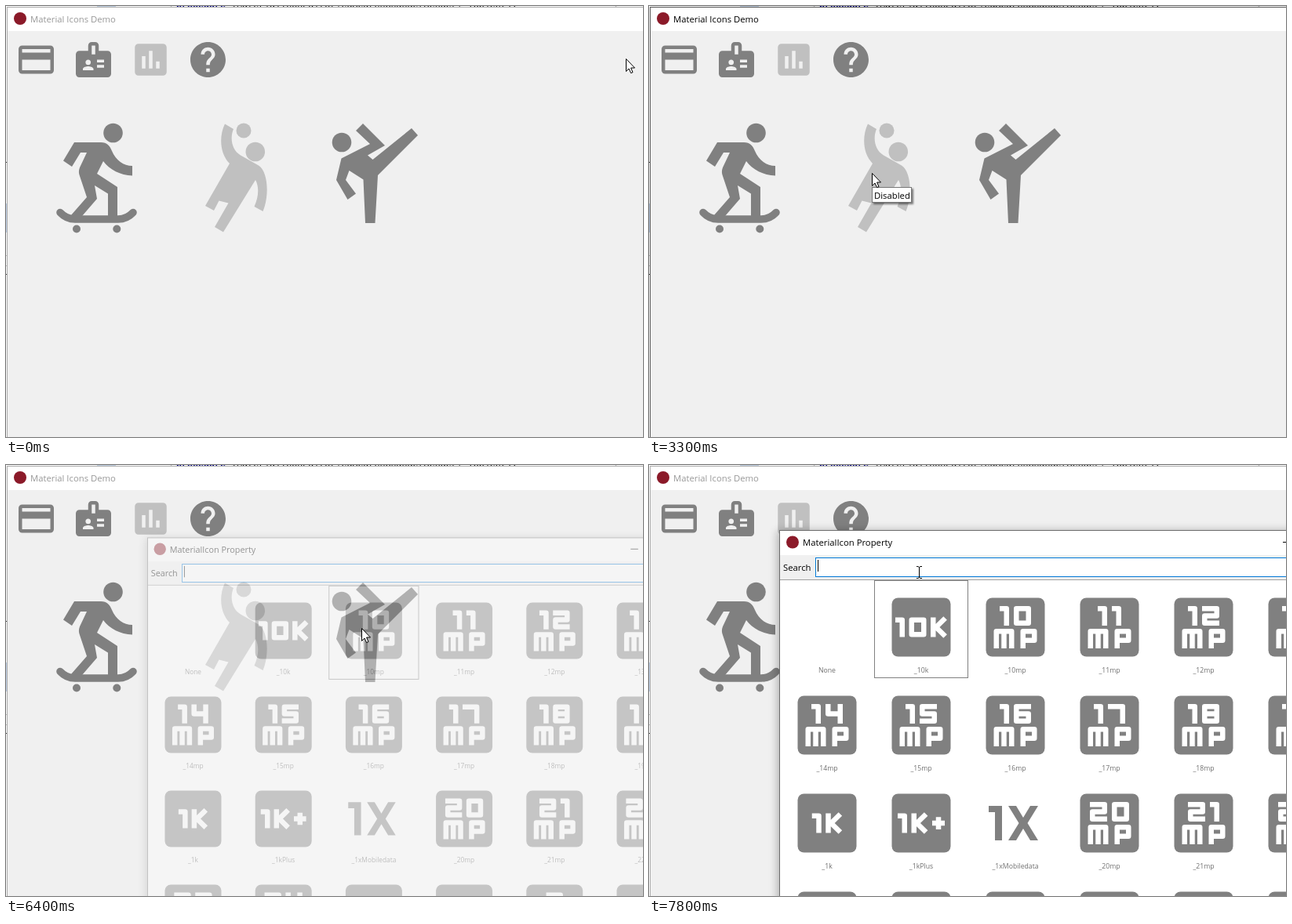
Animation, 812 px wide and 550 px high, one loop 8 s. Source, as an HTML page:

```html
<!DOCTYPE html>
<html lang="en">
<head>
<meta charset="utf-8">
<title>Material Icons Demo</title>
<style>
  html, body { margin: 0; width: 100%; height: 100%; overflow: hidden; background: #f0f0f0; }
  svg { display: block; width: 812px; height: 550px; }
  text { font: 11.3px "Open Sans", "Noto Sans", sans-serif; }
  .code { font: 11.7px "Liberation Mono", monospace; }
  .label { font-size: 8.7px; fill: #707070; text-anchor: middle; }
  .glyph { fill: none; stroke: #fff; stroke-width: 6.5; stroke-linecap: square; stroke-linejoin: round; }
  .glyph path { vector-effect: non-scaling-stroke; }
  #tip { filter: drop-shadow(2px 2px 1.2px rgba(0, 0, 0, .5)); }
</style>
</head>
<body>
<svg viewBox="0 0 812 550">
  <defs>
    <filter id="soft" x="-10%" y="-10%" width="120%" height="120%"><feGaussianBlur stdDeviation="6"/></filter>
  </defs>

  <!-- editor behind the window -->
  <rect width="812" height="550" fill="#fff"/>
  <rect x="116" width="24" height="2" fill="#c3d3e6"/>
  <path d="M210.5 0V2M777.5 0V2" stroke="#aaa"/>
  <text class="code" x="217" y="2" fill="#000"><tspan font-weight="bold" fill="#000080">procedure</tspan> TMaterialIconEditor.edSearchChange(Sender: TObject);</text>
  <path d="M0 252H2V289H0Z" fill="#bfd0e8"/>
  <path d="M0 199.5H2M0 342.5H2" stroke="#333"/>
  <path d="M0 318.5H1M0 331.5H1" stroke="#bbb"/>

  <!-- main window -->
  <rect x="1" y="1" width="820" height="560" fill="#f0f0f0"/>
  <rect x="1" y="1" width="820" height="31" fill="#fff"/>
  <rect id="edge" x="1.5" y="1.5" width="820" height="560" fill="none"/>
  <circle cx="18" cy="16" r="8" fill="#8b1a29"/>
  <text id="title" x="31" y="21">Material Icons Demo</text>

  <g fill="#808080">
    <path transform="translate(11.5 41.5) scale(2.25)" d="M20 4H4c-1.11 0-1.99.89-1.99 2L2 18c0 1.11.89 2 2 2h16c1.11 0 2-.89 2-2V6c0-1.11-.89-2-2-2zm0 14H4v-6h16v6zm0-10H4V6h16v2z"/>
    <path transform="translate(84.5 41.5) scale(2.25)" d="M20 7h-5V4c0-1.1-.9-2-2-2h-2c-1.1 0-2 .9-2 2v3H4c-1.1 0-2 .9-2 2v11c0 1.1.9 2 2 2h16c1.1 0 2-.9 2-2V9c0-1.1-.9-2-2-2zM9 12c.83 0 1.5.67 1.5 1.5S9.83 15 9 15s-1.5-.67-1.5-1.5S8.17 12 9 12zm3 6H6v-.75c0-1 2-1.5 3-1.5s3 .5 3 1.5V18zm1-9h-2V4h2v5zm5 7.5h-4V15h4v1.5zm0-3h-4V12h4v1.5z"/>
    <path transform="translate(157.5 41.5) scale(2.25)" fill="#c0c0c0" d="M19 3H5c-1.1 0-2 .9-2 2v14c0 1.1.9 2 2 2h14c1.1 0 2-.9 2-2V5c0-1.1-.9-2-2-2zM9 17H7v-7h2v7zm4 0h-2V7h2v10zm4 0h-2v-4h2v4z"/>
    <path transform="translate(230.5 41.5) scale(2.25)" d="M12 2C6.48 2 2 6.48 2 12s4.48 10 10 10 10-4.48 10-10S17.52 2 12 2zm1 17h-2v-2h2v2zm2.07-7.75l-.9.92C13.45 12.9 13 13.5 13 15h-2v-.5c0-1.1.45-2.1 1.17-2.83l1.24-1.26c.37-.36.59-.86.59-1.41 0-1.1-.9-2-2-2s-2 .9-2 2H8c0-2.21 1.79-4 4-4s4 1.79 4 4c0 .88-.36 1.68-.93 2.25z"/>
  </g>

  <!-- skater -->
  <g fill="#808080">
    <circle cx="136.5" cy="162" r="12.3"/>
    <path d="M87 174H121C129 174 132 178 135 185C140 197 150 204 161 204V216.5C146 216 132 209 124 198L116 214L142 231V268H130V239.5L113 229L116 246L97 268H82L103 244L94 217C92 212 93 208 95 204L103 187H95L84 205L73 197.5Z"/>
    <path d="M69 263.5C75 270 81 272 88 272H143C150 272 156 270 162 263.5" fill="none" stroke="#808080" stroke-width="9.6" stroke-linecap="round"/>
    <circle cx="90" cy="284.5" r="5"/>
    <circle cx="141.3" cy="284.5" r="5"/>
  </g>

  <!-- volleyball player -->
  <g fill="#c0c0c0">
    <circle cx="303" cy="159" r="9.5"/>
    <circle cx="317.8" cy="186" r="12.3"/>
    <path d="M279 150.5L290 157C285 169 288 184 299 190.5L322 203.5C334 211 336 242 327.5 262L316.5 256C322 244 323 231 318 222L277 288.5L266 282L283.5 251.5L271.5 248.5L265 261L254 255L285 201C273 189 271 167 279 150.5Z"/>
  </g>

  <!-- kicking figure -->
  <rect id="button" x="394.5" y="144.5" width="152" height="144" stroke="#bebebe"/>
  <g fill="#808080">
    <circle cx="428" cy="174" r="12.3"/>
    <path d="M446 159L455 150L483 178L461 190.5L467.5 196L517 156L525 165L474 216L470.5 277H458L455.5 221.5L437.5 210L433 222L446 239.5L435.5 247L421 222L427.5 194.5L464 176Z"/>
  </g>

  <!-- icon picker -->
  <g id="dialog">
    <rect x="164" y="84" width="720" height="520" fill="#000" opacity=".28" filter="url(#soft)"/>
    <rect x="166" y="83" width="720" height="520" fill="#fff"/>
    <rect x="167" y="115" width="720" height="32" fill="#f0f0f0"/>
    <path d="M167 146.5H890" stroke="#a0a0a0"/>
    <rect x="166.5" y="83.5" width="720" height="520" fill="none" stroke="#6c6c6c"/>
    <circle cx="183" cy="98.5" r="8" fill="#8b1a29"/>
    <text x="196" y="103">MaterialIcon Property</text>
    <path d="M808 98.5H818" stroke="#000"/>
    <text x="171" y="135">Search</text>
    <rect x="212.5" y="118.5" width="680" height="24" fill="#fff" stroke="#0078d7"/>
    <path id="caret" d="M215.5 121V136" stroke="#000"/>
    <g id="grid"></g>
    <rect id="pick" y="147.5" width="119" height="124" fill="none" stroke="#808080"/>
  </g>

  <g id="tip">
    <rect id="tipBox" x=".5" y=".5" height="19" fill="#fff" stroke="#767676"/>
    <text id="tipText" x="3" y="15"></text>
  </g>
  <path id="arrow" d="M.5.5V16.5L4 13L6.6 18.6L9 17.6L6.6 12H11.5Z" fill="#fff" stroke="#000"/>
  <path id="beam" d="M-3 -7.5H-1L.5 -6.5L2 -7.5H4M.5 -6.5V6.5M-3 7.5H-1L.5 6.5L2 7.5H4" fill="none" stroke="#000"/>
</svg>

<script>
const LOOP = 8000, STEP = 100;
const $ = id => document.getElementById(id);
const set = (id, attrs) => { for (const k in attrs) $(id).setAttribute(k, attrs[k]); };
const show = (id, on) => set(id, { visibility: on ? 'inherit' : 'hidden' });

// Block glyphs: [width, strokes in a unit box]
const GLYPHS = {
  0: [22, 'M0 0H1V1H0Z'],
  1: [12, 'M0 0H1V1'],
  2: [22, 'M0 0H1V.5H0V1H1'],
  3: [22, 'M0 0H1V1H0M.2 .5H1'],
  4: [22, 'M0 0V.5H1M1 0V1'],
  5: [22, 'M1 0H0V.5H1V1H0'],
  6: [22, 'M1 0H0V1H1V.5H0'],
  7: [22, 'M0 0H1V1'],
  8: [22, 'M0 0H1V1H0ZM0 .5H1'],
  9: [22, 'M0 1H1V0H0V.5H1'],
  M: [26, 'M0 1V0H1V1M.5 0V1'],
  P: [21, 'M0 1V0H1V.62H0'],
  K: [21, 'M0 0V1M.9 0L.25 .5L.9 1'],
  '+': [16, 'M0 .5H1M.5 .25V.75']
};

function word(str, cx, top, gap) {
  const chars = [...str], pen = 6.5, h = 25;
  let x = cx - (chars.reduce((sum, c) => sum + GLYPHS[c][0] + gap, -gap)) / 2;
  return chars.map(c => {
    const [w, d] = GLYPHS[c];
    const m = `translate(${x + pen / 2} ${top + pen / 2}) scale(${w - pen} ${h - pen})`;
    x += w + gap;
    return `<path transform="${m}" d="${d}"/>`;
  }).join('');
}

function cell(name, i) {
  const x = 227 + 120 * (i % 6), y = 207 + 125 * Math.floor(i / 6);
  const label = `<text class="label" x="${x}" y="${y + 58}">${name}</text>`;
  if (name === 'None') return label;
  if (name === '_1xMobiledata')
    return label + `<path transform="translate(${x} ${y})" fill="#808080" d="M-34 -22H-17V22H-26V-14H-34ZM-9 -22H1L10 -7L19 -22H29L15.500 0L29 22H19L10 7L1 22H-9L4.500 0Z"/>`;
  const [, num, unit] = name.match(/_(\d+)(.*)/);
  const art = unit === 'mp'
    ? word(num, x, y - 27, 6) + word('MP', x, y + 2, 8)
    : word(num + (unit === 'kPlus' ? 'K+' : 'K'), x, y - 12.5, 5.5);
  return label + `<rect x="${x - 37.5}" y="${y - 37.5}" width="75" height="75" rx="8" fill="#808080"/><g class="glyph">${art}</g>`;
}

const names = ('None _10k _10mp _11mp _12mp _13mp _14mp _15mp _16mp _17mp _18mp _19mp ' +
  '_1k _1kPlus _1xMobiledata _20mp _21mp _22mp _23mp _24mp _2k _2kPlus _2mp _3k').split(' ');
$('grid').innerHTML = names.map(cell).join('');

// Pointer stops after the first sweep: [time, x, y]
const STOPS = [
  [1000, 145, 198], [2500, 172, 201], [2600, 248, 209], [2700, 284, 213],
  [4200, 392, 210], [4300, 453, 208], [6900, 430, 193], [7000, 372, 155], [7100, 344, 137]
];
// Hints: [from, until, text, box width]
const TIPS = [
  [1400, 2500, 'No OnClick event', 97],
  [3200, 4200, 'Disabled', 50],
  [4800, 6300, 'OnClick is defined', 100]
];
// Picker opening: [time, opacity, scale]
const OPENING = [[6400, .38, .96], [6500, .8, .9885], [6600, .95, .997], [6700, 1, 1]];

const last = (list, t) => list.filter(k => k[0] <= t).pop();

function pointer(t) {
  if (t >= 1000) return last(STOPS, t).slice(1);
  const u = Math.min(1, t / 900) ** 2.71;
  return [Math.round(790 - 637 * u), Math.round(67 + 130 * u)];
}

function draw(time) {
  const t = Math.floor(time % LOOP / STEP) * STEP;
  const [x, y] = pointer(t);
  const active = t >= 100 && t < 6400;

  set('title', { fill: active ? '#000' : '#999' });
  set('edge', { stroke: active ? '#555' : '#aaa' });

  const pressed = t >= 6300;
  show('button', t >= 4300 && t < 6400);
  set('button', { fill: pressed ? '#c0c0c0' : 'none', stroke: pressed ? '#c0c0c0' : '#bebebe' });

  const tip = TIPS.find(k => t >= k[0] && t < k[1]);
  show('tip', tip);
  if (tip) {
    set('tip', { transform: `translate(${x} ${y + 18})`, opacity: t === tip[0] ? .5 : 1 });
    set('tipBox', { width: tip[3] });
    $('tipText').textContent = tip[2];
  }

  const open = last(OPENING, t);
  show('dialog', open);
  if (open) {
    const [, opacity, s] = open;
    set('dialog', { opacity, transform: `translate(514 318) scale(${s}) translate(-514 -318)` });
    set('pick', { x: t < 7000 ? 407.5 : 287.5 });
    show('caret', t < 7000 || t >= 7800);
  }

  const typing = t >= 7100;
  show('arrow', !typing);
  show('beam', typing);
  set(typing ? 'beam' : 'arrow', { transform: `translate(${x} ${y})` });
}

const start = performance.now();
function tick() {
  draw(performance.now() - start);
  requestAnimationFrame(tick);
}
tick();
</script>
</body>
</html>
```
